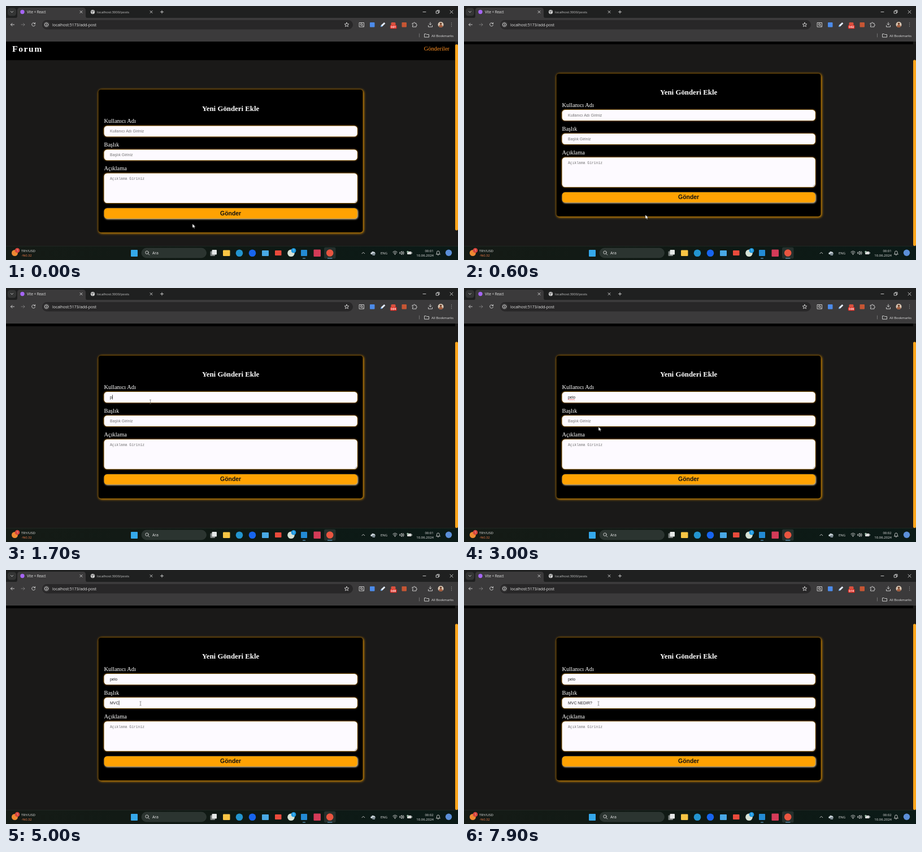
An HTML page for the animation above (8 s loop, 800 by 450 pixels).

```html
<!DOCTYPE html>
<html lang="tr">
<head>
<meta charset="utf-8">
<style>
html, body { margin: 0; width: 100%; height: 100%; overflow: hidden; background: #1a1918; }
svg { display: block; }
text { font: 6px "Open Sans", sans-serif; fill: #e6e6e6; white-space: pre; }
.mid { text-anchor: middle; }
.serif { font: 10.42px "Liberation Serif", serif; fill: #fff; }
.sans { font: 6.94px "Liberation Sans", sans-serif; }
.line { fill: none; stroke: #d8d8d8; stroke-width: .9; stroke-linecap: round; stroke-linejoin: round; }
.card { filter: drop-shadow(1px 1px 2px #ffa500); stroke: #7a5000; stroke-width: .5; }
.field { fill: #fdfaff; filter: drop-shadow(.8px .8px 1.6px #ffa500); }
.send { fill: #ffa202; filter: drop-shadow(1px 1px 1.6px #ffe8b8); }
</style>
</head>
<body>
<svg width="800" height="450" viewBox="0 0 800 450">
  <defs>
    <clipPath id="view"><rect y="63" width="795" height="362.5"/></clipPath>
    <linearGradient id="bar"><stop stop-color="#151b16"/><stop offset=".5" stop-color="#0f1914"/><stop offset="1" stop-color="#0b1a17"/></linearGradient>
  </defs>

  <!-- page -->
  <rect width="800" height="450" fill="#1a1918"/>
  <g clip-path="url(#view)">
    <g id="doc">
      <rect y="57" width="795" height="39"/>
      <text x="11" y="81" class="serif" style="font-size:15.6px;font-weight:bold;letter-spacing:1.6px">Forum</text>
      <text x="739.7" y="79" class="serif" style="fill:#ff9022">Gönderiler</text>
      <rect class="card" x="163.2" y="147.7" width="468.6" height="253.6" rx="5"/>
      <text x="397.6" y="185.6" class="serif mid" style="font-size:12.85px;font-weight:bold">Yeni Gönderi Ekle</text>
      <text x="173.5" y="207.4" class="serif">Kullanıcı Adı</text>
      <text x="173.5" y="249.4" class="serif">Başlık</text>
      <text x="173.5" y="291.4" class="serif">Açıklama</text>
      <rect class="field" x="173.6" y="212.4" width="448.2" height="18.8" rx="5.2"/>
      <rect class="field" x="173.6" y="254.4" width="448.2" height="18.8" rx="5.2"/>
      <rect class="field" x="173.6" y="296.6" width="448.2" height="52.4" rx="5.2"/>
      <path d="M617.5 348l3.5-3.5M619.5 348l1.5-1.5" stroke="#666" stroke-width=".6"/>
      <text id="user" x="184" y="224.2" class="sans"></text>
      <text id="title" x="184" y="266.2" class="sans"></text>
      <text x="184" y="308.4" style="font:6.36px 'Liberation Mono',monospace;fill:#757575">Açıklama Giriniz</text>
      <path id="squiggle" fill="none" stroke="#e33" stroke-width=".7"/>
      <rect id="caret" width=".7" height="8"/>
      <rect class="send" x="173.6" y="358.2" width="448.2" height="18.2" rx="5.2"/>
      <text x="397.6" y="370.6" class="mid" style="font:bold 10.42px 'Liberation Sans',sans-serif;fill:#111">Gönder</text>
    </g>
  </g>
  <rect id="thumb" x="795" width="5" height="329.5" rx="2" fill="#ffa51c"/>

  <!-- browser -->
  <rect width="800" height="22" fill="#1f2020"/>
  <rect y="21" width="800" height="42" fill="#3b3a3b"/>
  <path d="M16 21.5q4 0 4-4V8q0-5 5-5H136q5 0 5 5v9.5q0 4 4 4z" fill="#3b3a3b"/>
  <rect x="3" y="3.5" width="15" height="14" rx="4.5" fill="#343535"/>
  <path class="line" d="M8.5 9.5l2 2 2-2M131 8.500l4 4m0-4l-4 4M255 8.500l4 4m0-4l-4 4M273.500 10.500h5m-2.500-2.500v5M738 10.500h5M761.500 9h4v4h-4zM763 9v-1.300h4v4h-1.300M786 8l5 5m0-5l-5 5"/>
  <circle cx="29" cy="10.5" r="3.7" fill="#a565f5"/>
  <text x="37" y="12.9" style="font-size:6.2px">Vite + React</text>
  <circle cx="153.5" cy="10.5" r="3.7" fill="#d0d0d0"/>
  <path d="M150.5 9l3 .5-1 2 1 2M154 7.5l2 2.5" fill="none" stroke="#444" stroke-width=".9"/>
  <text x="161" y="12.9" style="font-size:5.95px;fill:#c9c9c9">localhost:3000/posts</text>
  <path class="line" d="M14.5 33H8.5m2.5-2.5L8.5 33l2.5 2.5M51.3 31.2a3 3 0 1 0 .3 2.5M51.6 29.5v2h-2"/>
  <path class="line" d="M27 33h6m-2.5-2.5L33 33l-2.5 2.5" opacity=".4"/>
  <rect x="64" y="25" width="550" height="16.5" rx="8.25" fill="#282728"/>
  <circle cx="71.5" cy="33" r="5.8" fill="#3b3a3b"/>
  <g class="line"><circle cx="71.5" cy="33" r="3.2"/><path d="M71.5 32.6v1.9M71.5 31.1v.1"/></g>
  <text x="82" y="35.5" style="font-size:6.93px">localhost:5173/add-post</text>
  <path class="line" d="M603 29.3l1.1 2.500 2.700.2-2.100 1.800.7 2.700-2.400-1.500-2.400 1.500.7-2.700-2.100-1.800 2.700-.2z"/>
  <g class="line"><rect x="625.5" y="29.5" width="8" height="7.5"/><circle cx="629" cy="32.7" r="1.7"/><path d="M630.3 34l1.7 1.7"/></g>
  <rect x="644" y="29" width="8.5" height="8.5" rx="1" fill="#4c8bea"/>
  <path d="M663 37l.8-3 5.500-5 2 2-5.300 5.200z" fill="#e5eefb"/><path d="M663 37l.8-3 2.200 2.200z" fill="#4d93df"/>
  <rect x="681.5" y="29" width="8" height="7" rx="1.5" fill="#d9503e"/>
  <rect x="679.8" y="33.9" width="11.7" height="6.3" rx="1.2" fill="#e02d24"/>
  <text id="rec" x="685.7" y="38.7" class="mid" style="font-size:4.5px;font-weight:bold;fill:#fff"></text>
  <rect x="700.5" y="29" width="8.5" height="8.5" rx="1" fill="#c65634"/>
  <path class="line" d="M719.5 30.500h2.200c-.3-2 2.400-2 2.100 0h2.200v2.200c2 0 2 2.100 0 2.100v2.200h-6.500v-2.300c1.600 0 1.600-2 0-2z"/>
  <path class="line" d="M751 29v4.500m-2-2l2 2 2-2M747.500 34.500V37h7v-2.500"/>
  <circle cx="769.5" cy="33" r="5" fill="#d9c7b4"/><path d="M766 36.5q0-3 3.500-3t3.500 3q-3.500 3-7 0z" fill="#a05a3c"/><circle cx="769.5" cy="31.5" r="1.9" fill="#70452f"/>
  <path class="line" d="M788.5 30v.1m0 2.900v.1m0 2.900v.1"/>
  <path class="line" d="M731.5 49v6" opacity=".4"/>
  <path class="line" d="M741 49.500h2.500l1 1h4v4.700H741z"/>
  <text x="753" y="54.5" style="font-size:5.85px">All Bookmarks</text>

  <!-- taskbar -->
  <rect y="425.5" width="800" height="24.5" fill="url(#bar)"/>
  <path d="M0 425.500h800" stroke="#27302b" stroke-width=".6"/>
  <circle cx="15.5" cy="437.5" r="5.5" fill="#ee8a32"/>
  <circle cx="20" cy="433" r="4.3" fill="#d8433c"/><text x="20" y="435" class="mid" style="font-size:5.5px">1</text>
  <text x="27" y="435.6" style="font-size:6.1px">TRY/USD</text>
  <text x="27.5" y="443.7" style="font-size:5.8px;fill:#f07c4a">-%0.32</text>
  <rect x="221" y="432" width="12" height="12" rx="1" fill="#35a8ea"/>
  <rect x="240" y="429" width="114.5" height="17" rx="8.5" fill="#2b3430" stroke="#39423e" stroke-width=".5"/>
  <g class="line"><circle cx="249.5" cy="436.7" r="2.7"/><path d="M251.5 438.700l2.300 2.300"/></g>
  <text x="259" y="440" style="font-size:6.9px">Ara</text>
  <rect x="361.5" y="434.5" width="8.5" height="8.5" rx="1" fill="#777d7b"/><rect x="364.5" y="432" width="8.5" height="8.5" rx="1" fill="#e5e8e7"/>
  <rect x="384" y="432.5" width="12.5" height="10.5" rx="1.2" fill="#f7c544"/>
  <circle cx="413" cy="437.7" r="6.3" fill="#2395cf"/>
  <circle cx="436" cy="437.7" r="6.3" fill="#1765ee"/>
  <rect x="453" y="433" width="12" height="10" rx="1" fill="#49a9e5"/>
  <rect x="476" y="433" width="11.5" height="9" rx="1" fill="#e84b3c"/>
  <circle cx="504.5" cy="437.7" r="6.3" fill="#d6e2d5"/>
  <circle cx="509" cy="433.2" r="4.3" fill="#1d9be4"/><text x="509" y="435.2" class="mid" style="font-size:5.5px">1</text>
  <rect x="522" y="432" width="11" height="11" rx="1" fill="#238bd4"/>
  <rect x="544.5" y="431.5" width="12.5" height="12.5" rx="1" fill="#d33b58"/>
  <rect x="563" y="427.5" width="20.5" height="20" rx="2.5" fill="#26302d"/>
  <circle cx="573.2" cy="437.5" r="6.3" fill="#e85540"/>
  <path d="M525.5 447h4M569.500 447h7.500" stroke="#72b8e5" stroke-width="1.1" stroke-linecap="round"/>
  <path class="line" d="M630 438.700l2.400-2.400 2.400 2.400"/>
  <path d="M646 440q-2-3 1-3.500 1-3 4-1 3 0 2.500 4.500z" fill="#c7d0d5"/><rect x="648.5" y="438" width="4.5" height="4" fill="#7e8b93"/>
  <text x="663" y="439.7" style="font-size:5.95px">ENG</text>
  <path class="line" d="M684.8 436q3.700-3.500 7.400 0M686 437.700q2.500-2.300 5 0M687.300 439.300q1.200-1 2.400 0M688.500 440.500v.1"/>
  <path class="line" d="M697.2 436.300h1.500l2-1.800v6l-2-1.800h-1.500zM702 436q1.200 1.500 0 3M703.300 434.700q2.300 2.800 0 5.600"/>
  <rect x="710" y="435" width="7.5" height="5" rx="1" fill="#dedede"/><path class="line" d="M718.5 436.800v1.400"/><circle cx="711" cy="435.5" r="1.7" fill="#9bbba5"/>
  <text id="clock" x="756.5" y="435.7" text-anchor="end" style="font-size:5.9px"></text>
  <text x="757" y="443.7" text-anchor="end">10.06.2024</text>
  <path class="line" d="M761.5 439.500l1-1.200v-2q.2-2.300 2.300-2.300t2.300 2.300v2l1 1.200zM764 441h1.600"/>
  <circle cx="783.5" cy="437.3" r="5.7" fill="#5b8fd8"/>

  <g id="pointer">
    <path id="arrow" d="M0 0v7l1.700-1.500 1.100 2.500 1.300-.6-1.100-2.400h2.300z" fill="#fff" stroke="#111" stroke-width=".4"/>
    <path id="beam" d="M-1.500-3.500h1.200l.3.300.3-.3h1.200M0-3.200v6.400M-1.500 3.500h1.200l.3-.3.3.3h1.200" fill="none" stroke="#666" stroke-width=".7"/>
  </g>
</svg>
<script>
const $ = id => document.getElementById(id);
const LOOP = 8000, STEP = 100, SCROLL = 28.3, BLINK = 640;

// [time, x, y]
const path = [[0, 330, 386], [400, 329, 385], [600, 321, 370], [1000, 255.5, 201.5],
  [2500, 255.5, 201.5], [2900, 238, 246], [3000, 238, 246], [3300, 238, 236.5]];

const inputs = [
  { id: 'user', hint: 'Kullanıcı Adı Giriniz', text: 'pelo', y: 217.7, from: 1100, to: 3400,
    keys: [1600, 1800, 2000, 2400] },
  { id: 'title', hint: 'Başlık Giriniz', text: 'MVC NEDIR?', y: 259.7, from: 3400, to: LOOP,
    keys: [4100, 4600, 5000, 5300, 6200, 6500, 6700, 6900, 7100, 7500] }
];

const clamp = p => Math.min(1, Math.max(0, p));
const show = (id, on) => $(id).style.display = on ? '' : 'none';

function pointerAt(t) {
  const i = path.findIndex(p => p[0] > t);
  if (i < 0) return path[path.length - 1].slice(1);
  const [a, b] = [path[i - 1], path[i]], p = (t - a[0]) / (b[0] - a[0]), k = p * p * (3 - 2 * p);
  return [a[1] + (b[1] - a[1]) * k, a[2] + (b[2] - a[2]) * k];
}

function drawInput(f, t) {
  const typed = f.keys.filter(k => k <= t), n = typed.length, el = $(f.id);
  el.textContent = n ? f.text.slice(0, n).replace(/ /g, '\u00a0') : f.hint;
  el.style.fill = n ? '#222' : '#757575';
  if (t < f.from || t >= f.to) return;
  const last = n ? typed[n - 1] : f.from;
  show('caret', (t - last) % BLINK < BLINK / 2);
  $('caret').setAttribute('x', 184.3 + (n ? el.getComputedTextLength() : 0));
  $('caret').setAttribute('y', f.y);
}

function draw(t) {
  // the wheel scroll is already under way when the loop starts
  const s = SCROLL * (1 - (1 - clamp(t / 200)) ** 3);
  $('doc').setAttribute('transform', `translate(0 ${-s})`);
  $('thumb').setAttribute('y', 68 + s * .97);

  show('caret', false);
  inputs.forEach(f => drawInput(f, t));
  show('squiggle', t >= 2500 && t < 3400);
  const w = $('user').getComputedTextLength();
  $('squiggle').setAttribute('d', 'M184 226' + 'q.75-1 1.5 0t1.5 0'.repeat(Math.round(w / 3)));

  const [x, y] = pointerAt(t), top = y + s;
  const overText = x > 173 && x < 622 && [[212, 231], [254, 273], [297, 349]].some(([a, b]) => top > a && top < b);
  $('pointer').setAttribute('transform', `translate(${x} ${y})`);
  show('arrow', !overText);
  show('beam', overText);

  const sec = Math.floor(1.3 + 1.65 * t / 1000);
  $('rec').textContent = '0:' + String(sec).padStart(2, '0');
  $('clock').textContent = t < 2400 ? '00:01' : '00:02';
}

function tick(now) {
  draw(Math.floor(now % LOOP / STEP) * STEP);
  requestAnimationFrame(tick);
}
tick(performance.now());
</script>
</body>
</html>
```
